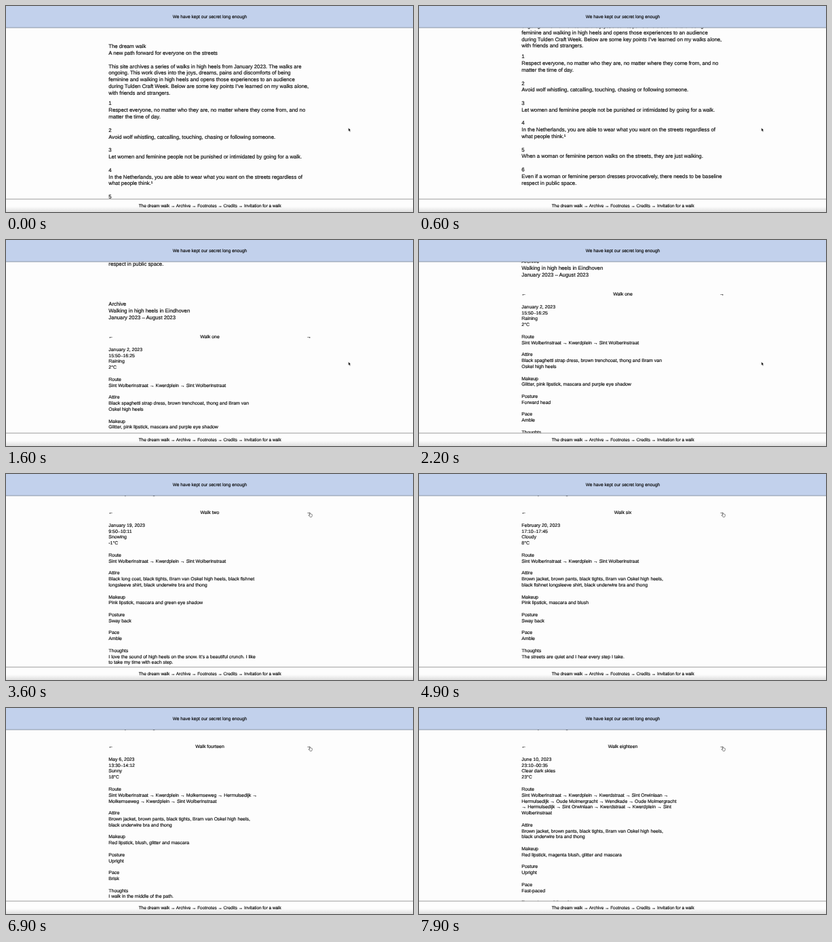
Write an HTML page that moves like this. It is 600 px wide and 304 px high and loops after 8 s.

```html
<!DOCTYPE html>
<html lang="en">
<head>
<meta charset="utf-8">
<title>The dream walk</title>
<style>
  html, body { margin: 0; width: 100%; height: 100%; overflow: hidden; background: #fdfdfd; }
  svg { display: block; width: 100vw; height: 100vh; }
  text {
    font-family: "Liberation Sans", Arial, sans-serif;
    fill: #0c0c0c; stroke: #0c0c0c; stroke-width: .16;
    text-rendering: geometricPrecision; white-space: pre;
  }
</style>
</head>
<body>
<svg viewBox="0 0 600 304">
  <defs>
    <linearGradient id="shade" x2="0" y2="1">
      <stop offset="0" stop-color="#fdfdfd"/>
      <stop offset="1" stop-color="#dedede"/>
    </linearGradient>
  </defs>
  <rect width="600" height="304" fill="#fdfdfd"/>
  <g id="page"><g id="intro"></g><g id="walk"></g></g>
  <g id="bars">
    <rect width="600" height="32" fill="#c2d1ec"/>
    <rect y="31.5" width="600" height="1" fill="#8c95a5"/>
    <rect y="285" width="600" height="19" fill="#fdfdfd"/>
    <rect y="296" width="600" height="8" fill="url(#shade)"/>
    <rect y="284.5" width="600" height="1" fill="#9c9c9c"/>
  </g>
  <g id="cursor">
    <path id="arrow" d="M0 0V5.2L1.2 4.1L2 6L3 5.6L2.2 3.8H3.7Z" fill="#000" stroke="#fff" stroke-width=".5"/>
    <path id="hand" d="M.2 .3Q.9-.4 1.4 .5L2 2.1Q2.6 1.7 3 2.2Q3.5 1.9 3.8 2.5Q4.5 2.3 4.6 3.2L4.3 5.3L3.8 6.4H1.3L-.8 3.9Q-.6 3.1 .3 3.6L1 4Z" fill="#fff" stroke="#222" stroke-width=".55" stroke-linejoin="round"/>
  </g>
</svg>
<script>
const LOOP = 8000, FRAME = 100, LEFT = 151.3;
const BODY = 7.75, SMALL = 6.95;
const $ = id => document.getElementById(id);

function addText(parent, content, x, middle, size, anchor = "start") {
  const node = document.createElementNS("http://www.w3.org/2000/svg", "text");
  const attributes = { x, y: middle + size * .35, "font-size": size, "text-anchor": anchor };
  for (const key in attributes) node.setAttribute(key, attributes[key]);
  node.textContent = content;
  parent.append(node);
}

function addLines(parent, lines, top, step, size) {
  lines.forEach((line, i) => line && addText(parent, line, LEFT, top + i * step, size));
}

const intro = [
  [59.3, "The dream walk/A new path forward for everyone on the streets"],
  [88.8, "This site archives a series of walks in high heels from January 2023. The walks are/ongoing. This work dives into the joys, dreams, pains and discomforts of being/feminine and walking in high heels and opens those experiences to an audience/during Tulden Craft Week. Below are some key points I’ve learned on my walks alone,/with friends and strangers."],
  [143.7, "1/Respect everyone, no matter who they are, no matter where they come from, and no/matter the time of day."],
  [183.2, "2/Avoid wolf whistling, catcalling, touching, chasing or following someone."],
  [212.5, "3/Let women and feminine people not be punished or intimidated by going for a walk."],
  [242, "4/In the Netherlands, you are able to wear what you want on the streets regardless of/what people think.¹"],
  [281.2, "5/When a woman or feminine person walks on the streets, they are just walking."],
  [310.5, "6/Even if a woman or feminine person dresses provocatively, there needs to be baseline/respect in public space."],
  [389.2, "Archive/Walking in high heels in Eindhoven/January 2023 – August 2023"]
];

const home = "Sint Wolberinstraat", start = `${home} → Kwerdplein →`;
const heels = "Bram van Oskel high heels";
const shortRoute = `${start} ${home}`;
const southRoute = `${start} 2e Harmoldersstraat → Lucas/Velmenstraat → Molkernseweg → Daniël Korvalaan → Vaartwende-Zuid/→ Vaartwende-Noord → Otto van der Prielaan → Molkernseweg → 2e/Harmoldersstraat → Kwerdplein → ${home}`;
const cityRoute = `${start} Kwerdstraat → Sint Orwinlaan →/Hermulsedijk → Oude Molmergracht → Wendkade → Oude Molmergracht/→ Hermulsedijk → Sint Orwinlaan → Kwerdstraat → Kwerdplein → Sint/Wolberinstraat`;
const laneRoute = `${start} Kwerdstraat → Sint Orwinlaan →/Kwerdstraat → Kwerdplein → ${home}`;
const roadRoute = `${start} Molkernseweg → Hermulsedijk →/Molkernseweg → Kwerdplein → ${home}`;
const coat = `Black long coat, black tights, ${heels}, black fishnet/longsleeve shirt, black underwire bra and thong`;
const jacket = `Brown jacket, brown pants, black tights, ${heels},/black fishnet longsleeve shirt, black underwire bra and thong`;
const jacketShort = `Brown jacket, brown pants, black tights, ${heels},/black underwire bra and thong`;
const quiet = "The streets are quiet and I hear every step I take.";

// name, date, time, weather, temperature, route, attire, makeup, posture, pace, thoughts
const walks = [
  ["one", "January 2, 2023", "15:50–16:25", "Raining", "2°C", shortRoute, `Black spaghetti strap dress, brown trenchcoat, thong and Bram van/Oskel high heels`, "Glitter, pink lipstick, mascara and purple eye shadow", "Forward head", "Amble", "My first walk outside. I look down at the ground/and listen to the rain."],
  ["two", "January 19, 2023", "9:50–10:11", "Snowing", "-1°C", shortRoute, coat, "Pink lipstick, mascara and green eye shadow", "Sway back", "Amble", "I love the sound of high heels on the snow. It’s a beautiful crunch. I like/to take my time with each step."],
  ["three", "January 27, 2023", "14:20–14:52", "Cloudy", "4°C", shortRoute, coat, "Red lipstick, mascara and blue eye shadow", "Forward head", "Brisk", "People look at my shoes first and then at my face. I keep my eyes ahead/and carry on."],
  ["four", "February 3, 2023", "16:05–16:40", "Windy", "6°C", laneRoute, coat, "Pink lipstick, glitter and mascara", "Upright", "Amble", "The wind carries the sound of the heels."],
  ["five", "February 11, 2023", "11:30–12:15", "Sunny", "7°C", roadRoute, jacket, "Red lipstick, blush and mascara", "Upright", "Brisk", "A stranger smiles and I smile back."],
  ["six", "February 20, 2023", "17:10–17:45", "Cloudy", "8°C", shortRoute, jacket, "Pink lipstick, mascara and blush", "Sway back", "Amble", quiet],
  ["seven", "March 4, 2023", "10:00–10:32", "Drizzle", "5°C", shortRoute, jacket, "Red lipstick, mascara and glitter", "Upright", "Fast-paced", "I feel taller than I did before."],
  ["eight", "March 15, 2023", "19:15–20:05", "Clear skies", "9°C", laneRoute, jacket, "Pink lipstick, glitter and mascara", "Upright", "Brisk", quiet],
  ["nine", "March 26, 2023", "12:40–14:10", "Cloudy", "11°C", southRoute, jacket, "Red lipstick, blush, glitter and mascara", "Sway back", "Amble", quiet],
  ["ten", "April 4, 2023", "11:10–21:16", "Sunny", "13°C", southRoute, jacket, "Pink lipstick, magenta blush, glitter, blue eyeshadow and mascara", "Upright", "Fast-paced", quiet],
  ["eleven", "April 12, 2023", "15:00–15:45", "Raining", "10°C", laneRoute, coat, "Pink lipstick, blush and mascara", "Forward head", "Amble", quiet],
  ["twelve", "April 21, 2023", "18:20–19:00", "Cloudy", "12°C", roadRoute, jacket, "Red lipstick, glitter and mascara", "Sway back", "Fast-paced", quiet],
  ["thirteen", "April 30, 2023", "20:10–20:55", "Sunny", "15°C", laneRoute, jacket, "Pink lipstick, magenta blush and mascara", "Upright", "Fast-paced", quiet],
  ["fourteen", "May 6, 2023", "13:30–14:12", "Sunny", "18°C", roadRoute, jacketShort, "Red lipstick, blush, glitter and mascara", "Upright", "Brisk", "I walk in the middle of the path."],
  ["fifteen", "May 14, 2023", "21:05–21:50", "Clear skies", "16°C", laneRoute, jacketShort, "Red lipstick, blush, glitter and mascara", "Upright", "Brisk", "I walk in the middle of the path."],
  ["sixteen", "May 23, 2023", "22:00–22:40", "Dark skies", "17°C", laneRoute, jacketShort, "Red lipstick, magenta blush and mascara", "Upright", "Fast-paced", "I walk in the middle of the path."],
  ["seventeen", "June 2, 2023", "22:30–23:40", "Cloudy", "19°C", roadRoute, jacket, "Pink lipstick, glitter and mascara", "Sway back", "Amble", quiet],
  ["eighteen", "June 10, 2023", "23:10–00:35", "Clear dark skies", "23°C", cityRoute, jacketShort, "Red lipstick, magenta blush, glitter and mascara", "Upright", "Fast-paced", quiet]
];
const sections = ["Route", "Attire", "Makeup", "Posture", "Pace", "Thoughts"];
const clicks = [3600, 4100, 4400, 4600, 4900, 5200, 5500, 5600, 5900, 6200, 6400, 6600, 6900, 7200, 7400, 7600, 7900];

// begin, end, scroll before, scroll after, sharpness
const swipes = [[0, 900, 0, 74, 1.7], [900, 1600, 74, 295, 1.816], [1800, 2600, 295, 381, 1.558]];

const progress = (t, begin, end) => Math.min(1, Math.max(0, (t - begin) / (end - begin)));
const smooth = p => p * p * (3 - 2 * p);

function scrollAt(t) {
  return swipes.reduce((y, [begin, end, from, to, sharpness]) =>
    y + (to - from) * smooth(1 - (1 - progress(t, begin, end)) ** sharpness), 0);
}

let shownWalk = -1;
function showWalk(index) {
  if (index === shownWalk) return;
  shownWalk = index;
  const group = $("walk");
  const [name, ...details] = walks[index];
  group.replaceChildren();
  addText(group, "←", LEFT - .3, 438, SMALL);
  addText(group, "Walk " + name, 300.5, 438, SMALL, "middle");
  addText(group, "→", 450, 438, SMALL, "end");
  const lines = details.slice(0, 4);
  sections.forEach((title, i) => {
    const heading = name === "eighteen" && title === "Thoughts" ? "Encounters and thoughts" : title;
    lines.push("", heading, ...details[4 + i].split("/"));
  });
  addLines(group, lines, 456.4, 8.81, SMALL);
}

function draw(time) {
  const t = Math.floor(time % LOOP / FRAME) * FRAME;
  $("page").setAttribute("transform", `translate(0 ${-scrollAt(t)})`);
  showWalk(clicks.filter(click => click <= t).length);

  const p = smooth(progress(t, 2800, 3500));
  const x = 504.8 - 58 * p, y = 179.8 - 122.8 * p;
  const overLink = p > .97;
  $("cursor").setAttribute("transform", `translate(${x} ${y})`);
  $("arrow").setAttribute("display", overLink ? "none" : "inline");
  $("hand").setAttribute("display", overLink ? "inline" : "none");
}

intro.forEach(([top, lines]) => addLines($("intro"), lines.split("/"), top, 9.8, BODY));
addText($("bars"), "We have kept our secret long enough", 300.5, 15.2, 6.6, "middle");
addText($("bars"), "The dream walk → Archive → Footnotes → Credits → Invitation for a walk", 300.7, 294.5, 6.42, "middle");

const began = performance.now();
function tick() {
  draw(performance.now() - began);
  requestAnimationFrame(tick);
}
tick();
</script>
</body>
</html>
```
